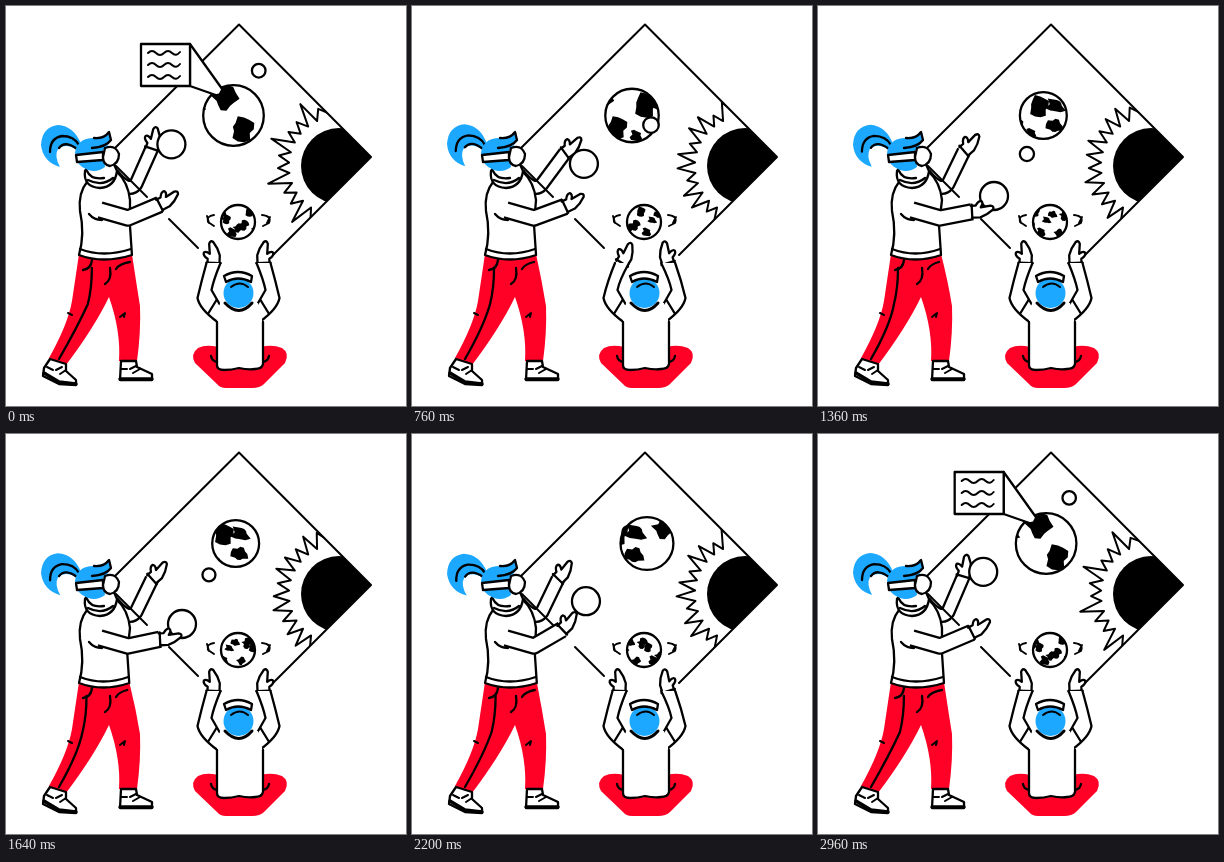
An HTML page with a canvas for the animation above (3000 ms loop, 400 by 400 pixels).

```html
<!DOCTYPE html>
<html lang="en">
<head>
<meta charset="utf-8">
<title>Virtual planets</title>
<style>
html, body { margin: 0; width: 100%; height: 100%; overflow: hidden; background: #fff; }
canvas { display: block; width: 400px; height: 400px; }
</style>
</head>
<body>
<canvas id="stage"></canvas>
<script>
const LOOP = 3000, STEP = 40, TAU = Math.PI * 2;
const BLUE = '#1ca8ff', RED = '#ff0026', INK = '#000', PAPER = '#fff', PEN = 2.3;
const { sin, cos, max, min } = Math;
const canvas = document.getElementById('stage');
const ratio = max(1, window.devicePixelRatio || 1);
canvas.width = canvas.height = 400 * ratio;
const g = canvas.getContext('2d');

// ---- drawing helpers ----
function paint(shape, fill, stroke = INK, width = PEN) {
  const p = typeof shape === 'string' ? new Path2D(shape) : shape;
  if (fill) { g.fillStyle = fill; g.fill(p); }
  if (stroke) { g.strokeStyle = stroke; g.lineWidth = width; g.stroke(p); }
}
const line = (d, width) => paint(d, null, INK, width);
function circle(x, y, r) {
  const p = new Path2D();
  p.arc(x, y, r, 0, TAU);
  return p;
}
const disc = (x, y, r, fill = PAPER, stroke = INK) => paint(circle(x, y, r), fill, stroke);
function poly(points) {
  const p = new Path2D();
  points.forEach(([x, y]) => p.lineTo(x, y));
  return p;
}
function inside(shape, draw) {
  g.save();
  g.clip(shape);
  draw();
  g.restore();
}
function at(x, y, turn, draw, sx = 1, sy = sx) {
  g.save();
  g.translate(x, y);
  g.rotate(turn * Math.PI / 180);
  g.scale(sx, sy);
  draw();
  g.restore();
}

// ---- eased cycle through a few poses: [time, ...values] ----
function pose(t, ...keys) {
  const i = keys.findLastIndex(k => k[0] <= t);
  const from = keys.at(i), to = keys[(i + 1) % keys.length];
  const wrap = v => (v + LOOP) % LOOP;
  const u = wrap(t - from[0]) / wrap(to[0] - from[0]), e = u * u * (3 - 2 * u);
  return from.slice(1).map((v, k) => v + (to[k + 1] - v) * e);
}

// ---- scene in the square ----
const SQUARE = new Path2D('M101 150L233 18.5L365 151L233 283Z');

function sun(a) {
  const polar = (deg, r) => [333 + r * cos(deg * TAU / 360), 160 + r * sin(deg * TAU / 360)];
  const rays = [polar(262, 52)];
  for (let i = 0; i < 12; i++) {
    const wild = 5.5 + 2.5 * cos(a);
    rays.push(polar(250 - 12 * i, 65 + wild * cos(2.1 * (i - 4) + 2 * a)), polar(244 - 12 * i, 50));
  }
  inside(SQUARE, () => {
    line(poly(rays), 2);
    disc(333, 160, 38, INK, null);
  });
}

// land is measured in planet radii and repeats every WRAP
const WRAP = 3.4;
const blob = (x, y, size, seed) => poly(Array.from({ length: 13 }, (_, i) => {
  const a = TAU * i / 13, r = size * (0.85 + 0.28 * sin(seed * 7.3 + i * i * 2.7));
  return [x + r * cos(a), y + r * sin(a)];
}));
const EARTH_LAND = [
  blob(-0.28, -0.55, 0.44, 1), blob(0.3, 0.45, 0.4, 9), blob(1.36, -0.4, 0.45, 3),
  blob(1.02, 0.75, 0.25, 4), blob(2.08, -0.42, 0.42, 5), blob(2.02, 0.45, 0.42, 6)
];
const GLOBE_LAND = Array.from({ length: 10 }, (_, i) =>
  blob(i * 0.34, 0.66 * sin(i * 2.25 + 0.6), 0.29 + 0.07 * sin(i * 3.1), i + 1));

function lands(x, y, r, list, t) {
  inside(circle(x, y, r), () => {
    for (const lap of [-1, 0, 1, 2]) {
      at(x + r * WRAP * (lap - t / LOOP), y, 0, () => list.forEach(p => paint(p, INK, null)), r);
    }
  });
}

function callout(t) {
  const s = t > LOOP / 2 ? t - LOOP : t;
  const size = min(1, (s + 580) / 120, (420 - s) / 120);
  if (size <= 0) return;
  at(224 - 0.042 * s, 94, 0, () => {
    g.translate(-89, -56);
    paint('M49 0L89 56L49 42Z', PAPER);
    paint('M0 0H49V42H0Z', PAPER);
    for (const y of [9, 21, 33]) line(`M7 ${y}q4 -4 8 0t8 0 8 0 8 -1`, 2);
  }, size);
}

function moon(a) {
  // the orbit slows while passing behind the planet
  const p = a - 0.32 * max(0, cos(a - 5.6)) ** 6;
  disc(229.2 + 24.3 * cos(p) + 10.3 * sin(p), 105.8 - 40.3 * cos(p) + 12.4 * sin(p), 6.8 + sin(a));
}

function space(t, a) {
  line('M106 145L233 18.5L365 151L267 249', 2);
  line('M163 213L192 242', 2);
  sun(a);
  const x = 227.5 - 7.5 * sin(a), y = 109.5, r = 26.8 + 3.5 * cos(a);
  const near = sin(a) > 0;
  if (!near) moon(a);
  disc(x, y, r);
  callout(t);
  lands(x, y, r, EARTH_LAND, t);
  if (near) moon(a);

  disc(232, 216, 17);
  lands(232, 216, 17, GLOBE_LAND, t);
  line('M208 209Q200 210 202 216L208 220M201 210L203 217', 1.9);
  line('M256 209Q266 210 263 217L257 220M264 211L261 217', 1.9);
}

// ---- people ----
function limb(d, width, root = d) {
  g.lineCap = 'butt';
  line(d, width);
  g.lineCap = 'round';
  paint(root, null, PAPER, width - 2 * PEN);
}
function hand(x, y, turn, flip = 1) {
  at(x, y, turn, () => {
    paint('M-1 -6L4 -6Q7 -11 10 -10Q12 -8 9 -4L19 -5Q23 -4 21 -1Q15 4 8 6L0 6', PAPER);
    line('M0 -7V7');
  }, 1, flip);
}

function trousers(dx) {
  paint(`M73 248L${123 + dx} 248Q130 275 134 300Q135 326 131 355L113 355Q115 325 103 291Q88 322 60 359L43 352Q62 318 66 295Z`, RED, null);
  const x = 80 + 2 * dx;
  line(`M${x} 262Q${x} 282 ${x - 4} 298Q72 320 53 353`);
  line(`M86 254Q85 263 77 264M${121 + dx} 256Q113 258 110 263M104 262Q106 274 99 278`);
  line('M62 307L66 309M114 311L119 307L118 311', 2);
}

function shoes() {
  paint('M44 353L60 358L60 365L70 374V379L53 378L37 370L38 362Z', PAPER);
  line('M38 367L53 376L70 378', 3.4);
  line('M50 364L56 361M54 368L60 364M41 361L47 364', 2);
  paint('M115 355H130L131 361L146 368V374H114Z', PAPER);
  line('M114 373H146', 3.4);
  line('M124 363L130 360M127 367L134 363M115 363H121', 2);
}

function head(a) {
  paint('M79 165Q77 181 94 182Q109 181 111 165L107 156L84 158Z', PAPER);
  line('M81 165Q85 174 98 172M82 174Q96 181 107 172');
  at(72, 138, 2 * sin(a), () => {
    g.translate(-72, -138);
    paint('M75 138Q68 120 52 119Q36 121 35 139Q37 156 54 161Q48 150 52 143Q60 136 73 145Z', BLUE, null);
    line('M44 146Q44 132 56 130Q68 130 73 139M53 142Q59 134 71 143');
  });
  paint('M69 147Q71 133 86 132Q98 134 104 126Q107 137 97 144L99 161Q91 167 82 164Q70 160 69 147Z', BLUE, null);
  line('M86 142Q100 141 105 134L103 126Q98 133 88 132');
  paint('M70 149L97 146V154L71 156Z', PAPER);
  paint('M99 142Q109 138 113 148Q113 158 104 160Q97 159 97 151Z', PAPER);
}

function woman(t, a) {
  const [fx, fy, fa] = pose(t, [760, 153, 147, -36], [1200, 146, 145, -40], [2160, 146, 145, -45], [2600, 143, 141, -84]);
  const [nx, ny, na] = pose(t, [700, 153, 200, -27], [1040, 154, 206, -3], [1960, 154, 205, -3], [2240, 150, 195, -46], [2600, 154, 198, -27]);
  const [by] = pose(t, [580, 143], [1060, 190], [1930, 190], [2540, 135]);
  const bx = 176 - 12 * ((190 - by) / 55) ** 2;
  const dx = 1.5 + 1.5 * cos(a + 0.3);

  limb(`M106 168Q122 188 130 178L${fx} ${fy}`, 15);
  hand(fx, fy, fa);
  line('M110 160L141 191', 2);
  disc(bx, by, 14);

  trousers(dx);
  shoes();
  paint(`M81 176Q72 187 74 205Q79 228 73 249Q97 258 ${123 + dx} 249L${121 + dx} 219L124 194Q122 176 111 166Z`, PAPER);
  line(`M74 243Q97 252 ${122 + dx} 243`);
  head(a);

  const reach = `L122 212L${nx} ${ny}`;
  limb('M94 204' + reach, 17.5, 'M87 202' + reach);
  line('M83 208Q88 214 96 214');
  hand(nx, ny, na);
}

// one raised arm, drawn for the left side and mirrored for the right
function raisedArm(side, tilt) {
  at(232.5, 0, 0, () => {
    const w = 22 - tilt / 12;
    hand(-w - 3, 257, tilt - 88);
    paint(`M${-w - 10} 257Q-37 275 -41 292Q-39 303 -21 316L-19 298L-27 284Q-25 274 ${-w + 4} 257Z`, PAPER, null);
    line(`M${-w - 10} 257Q-37 275 -41 292Q-39 303 -21 316M-19 298L-27 284Q-25 274 ${-w + 4} 257`);
    line('M-30 307L-22 294');
  }, side, 1);
}

function man(a) {
  const swing = sin(a) ** 4;
  paint('M212 341Q200 338 192 342Q184 348 189 357L211 378Q214 382 220 382H246Q254 382 258 378L279 357Q284 347 276 342Q266 338 255 341Z', RED, null);
  raisedArm(1, 30 * swing * (sin(a) > 0));
  raisedArm(-1, 16 * swing);
  paint('M211 312L214 297H252L256 312L257 359Q256 364 248 364Q240 362 233 363Q226 364 217 364Q211 363 211 359Z', PAPER, null);
  line('M211 316V359Q211 364 218 364Q226 364 233 362Q242 364 249 363Q256 363 257 358V316M205 350Q206 355 211 356M263 350Q262 355 257 356');
  line('M219 297Q233 312 246 297', 3);
  disc(232.5, 287, 15, BLUE, null);
  paint('M218 270Q232 262 246 270L245 276Q232 269 220 276Z', PAPER);
  line('M225 281Q234 274 242 281', 2);
}

function draw(t) {
  const a = TAU * t / LOOP;
  g.setTransform(ratio, 0, 0, ratio, 0, 0);
  g.fillStyle = PAPER;
  g.fillRect(0, 0, 400, 400);
  g.lineCap = g.lineJoin = 'round';
  space(t, a);
  woman(t, a);
  man(a);
}

const start = performance.now();
function tick() {
  const t = (performance.now() - start) % LOOP;
  draw(Math.floor(t / STEP) * STEP);
  requestAnimationFrame(tick);
}
tick();
</script>
</body>
</html>
```
